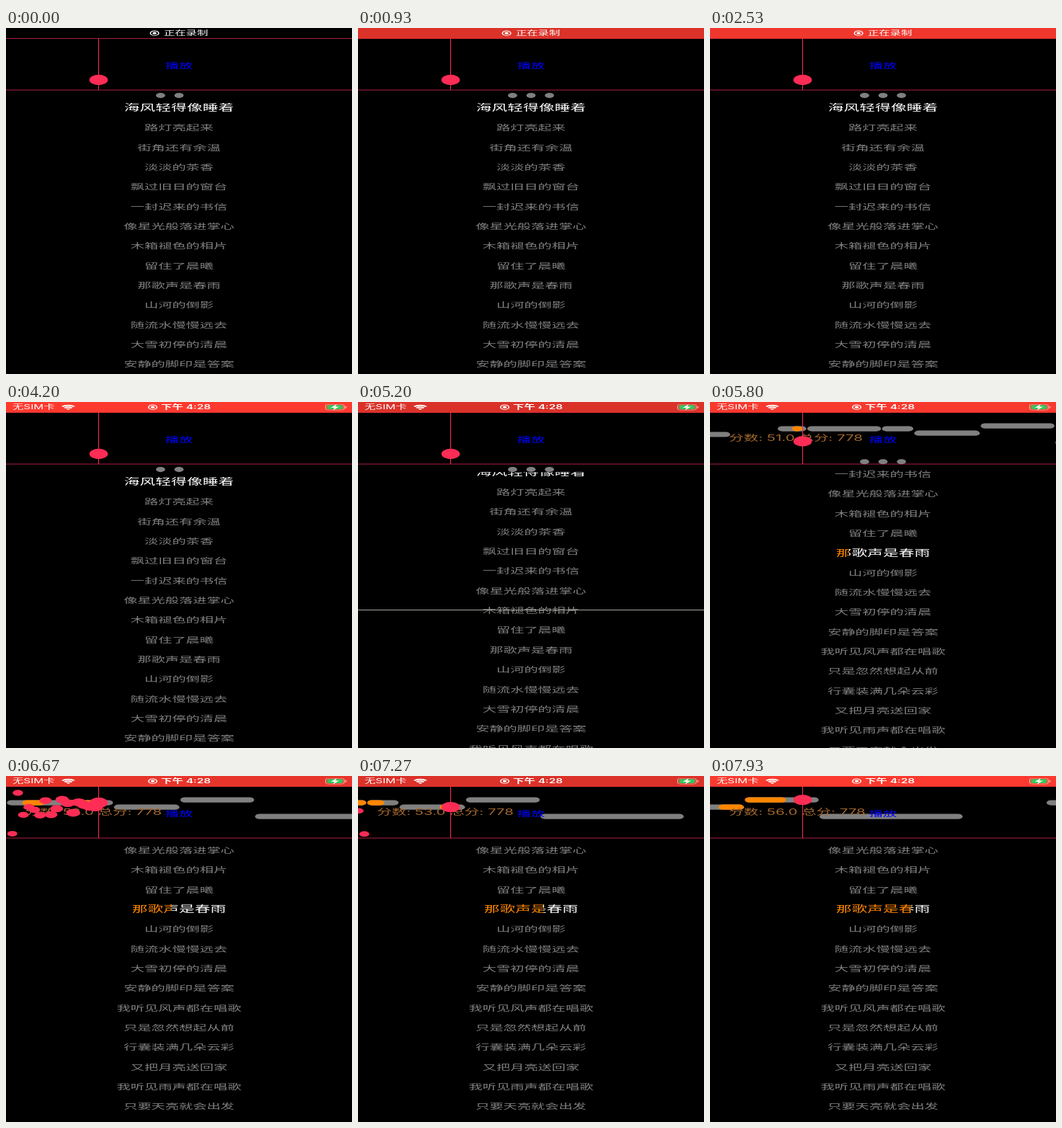
An HTML page with a canvas that plays this animation: 480x480 px, repeating every 8000 ms.

```html
<!DOCTYPE html>
<html lang="zh-CN">
<head>
<meta charset="utf-8">
<style>
html, body { margin: 0; width: 100%; height: 100%; overflow: hidden; background: #000; }
canvas { display: block; width: 100vw; height: 100vh; }
</style>
</head>
<body>
<canvas id="stage" width="480" height="480"></canvas>
<script>
const ctx = document.getElementById('stage').getContext('2d');
const LOOP = 8000;
// The stage shows a 375 x 667 phone screen squeezed into a square.
const W = 375, H = 667, MID = W / 2;
const FONT = "Inter, 'Noto Sans CJK SC', 'Noto Sans CJK', sans-serif";
const GRAY = '#808080', PINK = '#ff2d55', ORANGE = '#ff8600', FRAME = '#c8234a';

const LINES = ('海风轻得像睡着 路灯亮起来 街角还有余温 淡淡的茶香 飘过旧日的窗台 一封迟来的书信 ' +
  '像星光般落进掌心 木箱褪色的相片 留住了晨曦 那歌声是春雨 山河的倒影 随流水慢慢远去 ' +
  '大雪初停的清晨 安静的脚印是答案 我听见风声都在唱歌 只是忽然想起从前 行囊装满几朵云彩 ' +
  '又把月亮送回家 我听见雨声都在唱歌 只要天亮就会出发').split(' ');
const SUNG_LINE = 9, ROW = 38, ROW_TOP = 154, SCROLL = 239;

const SEEK = 5500, LINE_X = 100, SPEED = 0.12;
// One note per character of the sung line: length and height, end to end.
const MELODY = [[32, 51.5], [81, 51.5], [35, 51.5], [72, 60], [81, 46], [156, 78]];
const MELODY_START = 73.5, REST = 90;
const VOICE_START = 89, IDLE_Y = 100;
const SUNG = [[VOICE_START, 105], [122, 147], [171, 205], [265, 338]];

let noteX = MELODY_START;
const CHARS = MELODY.map(([length, y]) => ({ start: noteX, end: noteX += length, y }));
const NOTES = [{ start: -40, end: 23, y: 62.5 }, ...CHARS,
  { start: noteX + REST, end: noteX + 2 * REST, y: 51.5 }];

const clamp = v => Math.max(0, Math.min(1, v));
const ramp = (t, from, to) => clamp((t - from) / (to - from));
const random = seed => Math.abs(Math.sin(seed * 12.9898) * 43758.5453) % 1;

function smooth(t, from, to) {
  const u = ramp(t, from, to);
  return u * u * (3 - 2 * u);
}

function rect(x, y, w, h, color) {
  ctx.fillStyle = color;
  ctx.fillRect(x, y, w, h);
}

function circle(x, y, r, color) {
  ctx.fillStyle = color;
  ctx.beginPath();
  ctx.arc(x, y, r, 0, 7);
  ctx.fill();
}

function arc(x, y, r, from, to, width) {
  ctx.strokeStyle = '#fff';
  ctx.lineWidth = width;
  ctx.beginPath();
  ctx.arc(x, y, r, from, to);
  ctx.stroke();
}

function pill(x0, x1, y, h, color, r = h / 2) {
  ctx.fillStyle = color;
  ctx.beginPath();
  ctx.roundRect(x0, y - h / 2, x1 - x0, h, r);
  ctx.fill();
}

function text(str, x, y, size, color, align = 'left', weight = 400) {
  ctx.font = `${weight} ${size}px ${FONT}`;
  ctx.textAlign = align;
  ctx.fillStyle = color;
  ctx.fillText(str, x, y + size * 0.37);
}

function clipped(x, y, w, h, draw) {
  ctx.save();
  ctx.beginPath();
  ctx.rect(x, y, w, h);
  ctx.clip();
  draw();
  ctx.restore();
}

function recordIcon(x) {
  arc(x, 10, 4.5, 0, 7, 1.2);
  circle(x, 10, 2.2, '#fff');
}

function wifiIcon(x, y) {
  for (let r = 2; r < 10; r += 3.6) arc(x, y, r, -Math.PI * 0.75, -Math.PI * 0.25, 2.4);
}

function batteryIcon() {
  ctx.strokeStyle = 'rgba(255,255,255,.55)';
  ctx.lineWidth = 1;
  ctx.beginPath();
  ctx.roundRect(346.5, 4.5, 20, 11, 3);
  ctx.stroke();
  pill(367.5, 369, 10, 4, 'rgba(255,255,255,.55)', 0.7);
  pill(348, 365, 10, 8, '#34c759', 1.5);
  ctx.fillStyle = '#fff';
  ctx.fill(new Path2D('M358.5 4L352 11h4l-1.5 5L361 9h-4z'));
}

function statusBar(t) {
  const pulse = 0.925 + 0.075 * Math.cos((t - 4100) / 1000 * Math.PI);
  const clock = ramp(t, 3300, 3600);
  ctx.globalAlpha = pulse * ramp(t, 70, 700);
  rect(0, 0, W, 20.5, '#ff3b30');
  ctx.globalAlpha = 1 - clock;
  recordIcon(161);
  text('正在录制', 171, 10, 12, '#fff');
  ctx.globalAlpha = clock;
  text('无SIM卡', 7, 10, 12, '#fff');
  wifiIcon(67.5, 15.5);
  recordIcon(159);
  text('下午 4:28', 168, 10, 12, '#fff', 'left', 600);
  batteryIcon();
  ctx.globalAlpha = 1;
}

function drawNotes(head) {
  const shift = head - LINE_X;
  for (const { start, end, y } of NOTES) {
    pill(start - shift, end - 1 - shift, y, 10, GRAY);
    for (const [from, to] of SUNG) {
      const x0 = Math.max(start, from), x1 = Math.min(end - 1, to, head);
      if (x1 > x0) pill(x0 - shift, x1 - shift, y, 10, ORANGE);
    }
  }
}

function voiceHeight(x) {
  return x < VOICE_START ? IDLE_Y : CHARS.find(note => x < note.end).y;
}

// The ball glides to the pitch: the mean height over the last stretch sung.
function ballHeight(head) {
  const STEPS = 24;
  let sum = 0;
  for (let i = 0; i < STEPS; i++) sum += voiceHeight(head - i);
  return sum / STEPS;
}

// Sparks stream left from the ball, fanning out and shrinking with age.
function drawSparks(t) {
  for (let i = 0; i < 16; i++) {
    const age = t - 6050 - i * 40;
    if (age < 0 || age > 900) continue;
    const dist = 0.15 * age;
    circle(LINE_X - dist, 58 + dist * (random(i + 1) - 0.35), 8.5 - age / 200, PINK);
  }
}

function pitchView(t, head) {
  rect(0, 19.7, W, 1.2, FRAME);
  rect(0, 119, W, 1.2, FRAME);
  clipped(0, 20, W, 100, () => {
    if (t >= SEEK) {
      drawNotes(head);
      const gained = Math.floor(5.1 * ramp(t, 5800, 7930) ** 1.7);
      text(`分数: ${51 + gained}.0 总分: 778`, 20.5, 69.5, 16, '#a5692f');
    }
    rect(LINE_X, 20, 0.8, 100, PINK);
    drawSparks(t);
    circle(LINE_X + 0.4, ballHeight(head), 10, PINK);
  });
  text('播放', MID, 72.5, 15, '#00f', 'center');
}

function countdownDots(t, lift) {
  if (t > 5950) return;
  const count = t % 2000 < 500 ? 2 : 3;
  for (let i = 0; i < count; i++) circle(167.5 + 20 * i, 130 - lift, 5, GRAY);
}

function lyrics(t, head, lift) {
  const scroll = SCROLL * smooth(t, 5030, 6040);
  const active = t < SEEK ? 0 : SUNG_LINE;
  const sungChars = CHARS.reduce((sum, note) => sum + ramp(head, note.start, note.end), 0);
  const top = 135 - lift;
  clipped(0, top, W, H - top, () => {
    LINES.forEach((line, i) => {
      const y = ROW_TOP + ROW * i - scroll;
      if (i !== active) return text(line, MID, y, 15, GRAY, 'center');
      text(line, MID, y, 17, '#fff', 'center');
      if (!active) return;
      const left = MID - line.length * 17 / 2;
      clipped(left, y - 12, sungChars * 17, 24, () => {
        rect(left, y - 12, W, 24, '#000');
        text(line, MID, y, 17, ORANGE, 'center', 500);
      });
    });
  });
  if (t > 5030 && t < SEEK) rect(0, 400.3, W, 1.39, '#a8a8a0');
}

function draw(t) {
  const head = LINE_X + (t - 5800) * SPEED;
  const lift = 15 * ramp(t, SEEK, 5750);
  ctx.setTransform(480 / W, 0, 0, 480 / H, 0, 0);
  rect(0, 0, W, H, '#000');
  lyrics(t, head, lift);
  pitchView(t, head);
  countdownDots(t, lift);
  statusBar(t);
}

function tick() {
  draw(performance.now() % LOOP);
  requestAnimationFrame(tick);
}
tick();
</script>
</body>
</html>
```
